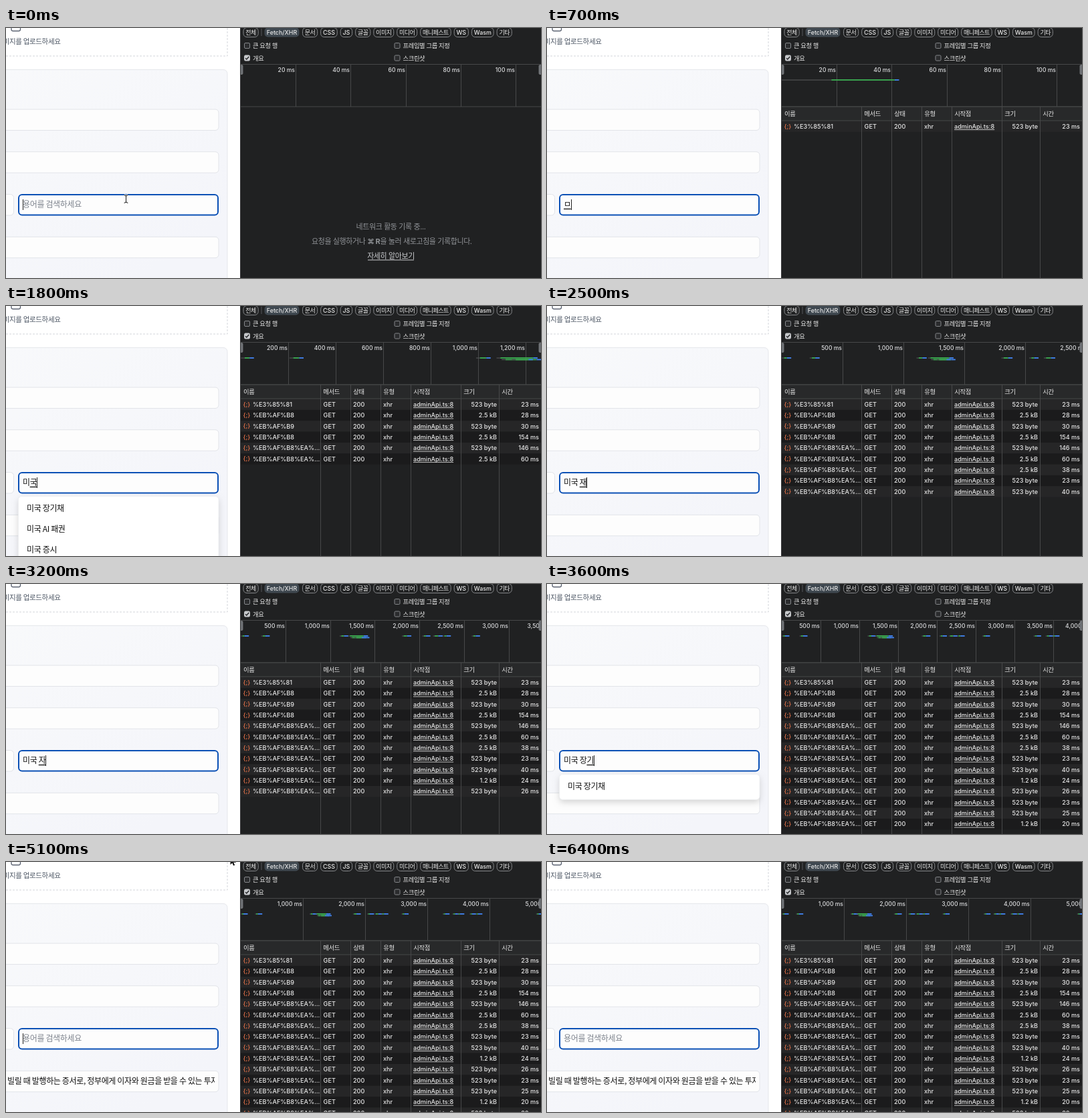
An HTML page with a canvas that plays this animation: 800 px wide and 375 px high, repeating every 6.7 s.

```html
<!DOCTYPE html>
<html lang="ko">
<head>
<meta charset="utf-8">
<title>Search requests</title>
<style>
html, body { margin: 0; width: 100%; height: 100%; overflow: hidden; background: #fff; }
canvas { display: block; width: 100vw; height: 100vh; }
</style>
</head>
<body>
<canvas id="stage" width="800" height="375"></canvas>
<script>
const ctx = document.getElementById('stage').getContext('2d');
const LOOP = 6700, TICK = 100, W = 800, H = 375;
const START = 700, SELECT = 4650, FOCUS = 4900, BLINK = 400;
const PAGE = '"Noto Sans CJK KR", "Noto Sans CJK", sans-serif';
const TOOL = 'Inter, "Noto Sans CJK KR", "Noto Sans CJK", sans-serif';
const LINE = '#474849', LIGHT = '#e8e8e8', MUTED = '#919498';

const ITEMS = ['미국 장기채', '미국 AI 패권', '미국 증시', '미국 국채'];
// every edit sends a request: [time, search text, response ms]
const EDITS = [
  [START, 'ㅁ', 23], [890, '미', 28], [1620, '믹', 30], [1700, '미', 154], [1720, '미구', 146], [1760, '미국', 60],
  [2200, '미국 ', 38], [2390, '미국 ㅈ', 23], [2490, '미국 재', 40], [2580, '미국 장', 24], [2850, '미국 자', 26],
  [3400, '미국 ㅈ', 23], [3530, '미국 자', 25], [3600, '미국 장기', 20], [3760, '미국 장깇', 20],
  [3840, '미국 장기채', 22], [SELECT, '', 24]
];
// time and width of the recorded range in ms
const SPAN = [[0, 109], [START, 109], [1100, 331], [1500, 331], [1800, 1262], [2500, 2460], [3600, 3862], [4900, 4817]];
const PILLS = ['전체', 'Fetch/XHR', '문서', 'CSS', 'JS', '글꼴', '이미지', '미디어', '매니페스트', 'WS', 'Wasm', '기타'];
const COLS = [['메서드', 470.5], ['상태', 515.5], ['유형', 560.5], ['시작점', 605.5], ['크기', 680.5], ['시간', 737.5]];

const matches = s => s ? ITEMS.filter(item => item.startsWith(s)) : [];
const REQUESTS = EDITS.map(([time, query, ms]) => {
  const code = encodeURIComponent(query).replace('%20', ' ');
  return {
    time, ms,
    start: (time - START) * 1.2,
    name: code.length > 9 ? code.slice(0, 13) + '...' : code,
    size: ['523 byte', '1.2 kB', '2.5 kB'][Math.min(2, matches(query).length)]
  };
});

function ramp(keys, t) {
  const i = keys.findIndex(k => k[0] > t);
  if (i < 0) return keys[keys.length - 1][1];
  const [a, b] = [keys[i - 1], keys[i]];
  return a[1] + (b[1] - a[1]) * (t - a[0]) / (b[0] - a[0]);
}

function rect(x, y, w, h, fill) {
  ctx.fillStyle = fill;
  ctx.fillRect(x, y, w, h);
}

function box(x, y, w, h, r, fill, stroke, lw = 1) {
  ctx.beginPath();
  ctx.roundRect(x, y, w, h, r);
  if (fill) { ctx.fillStyle = fill; ctx.fill(); }
  if (stroke) { ctx.strokeStyle = stroke; ctx.lineWidth = lw; ctx.stroke(); }
}

function path(points, stroke, lw = 1) {
  ctx.beginPath();
  points.forEach(p => ctx.lineTo(p[0], p[1]));
  ctx.strokeStyle = stroke;
  ctx.lineWidth = lw;
  ctx.stroke();
}

const hline = y => path([[351, y], [W, y]], LINE);
const vline = (x, y0, y1) => path([[x, y0], [x, y1]], LINE);

function setFont(size, family, weight, gap) {
  ctx.font = `${weight} ${size}px ${family}`;
  ctx.letterSpacing = gap + 'px';
}

const pageFont = (weight = 400) => setFont(12, PAGE, weight, -0.35);
const toolFont = (size = 9.1) => setFont(size, TOOL, 500, 0);
const koFont = () => setFont(9.3, TOOL, 500, -0.35);

function text(s, x, y, color, align = 'left') {
  ctx.textAlign = align;
  ctx.fillStyle = color;
  ctx.fillText(s, x, y);
  return ctx.measureText(s).width;
}

function clip(x, y, w, h, draw) {
  ctx.save();
  ctx.beginPath();
  ctx.rect(x, y, w, h);
  ctx.clip();
  draw();
  ctx.restore();
}

function drawForm(t) {
  rect(0, 0, 351, H, '#fff');
  ctx.setLineDash([3, 2]);
  path([[331, 0], [331, 42], [0, 42]], '#d3d6db');
  ctx.setLineDash([]);
  box(8, -9, 13.5, 13.5, 2.5, null, '#596170', 1.3);
  setFont(10.5, PAGE, 400, -0.35);
  text('이미지를 업로드하세요', 81.5, 23.7, '#4b5563', 'right');

  const shade = ctx.createLinearGradient(0, 62, 200, H);
  shade.addColorStop(0, '#f8f9fb');
  shade.addColorStop(1, '#f4f5fa');
  box(-20, 62.5, 351, 340, 6, shade, '#e5e7eb');
  for (const [y, right] of [[122, 318], [185.7, 318], [249.5, 11.5], [313.3, 318]])
    box(-20, y, right + 20, 31.5, 5, '#fdfdfd', '#e2e4e9');
  box(19, 250, 298, 30.5, 5, '#fdfdfd', '#0b50b5', 2);

  if (t >= SELECT) clip(0, 314, 312, 30, () => {
    pageFont(500);
    text('빌릴 때 발행하는 증서로, 정부에게 이자와 원금을 받을 수 있는 투자', 2, 332.5, '#111');
  });
  const [since, query] = EDITS.findLast(e => e[0] <= t) || [0, ''];
  drawSearch(query, t - (t < FOCUS ? since : FOCUS));
  drawMenu(matches(query));
}

function drawSearch(query, idle) {
  pageFont();
  let end = 25;
  if (query) {
    end += text(query, 25, 268.7, '#111');
    // the last syllable is still being composed
    const from = 25 + ctx.measureText(query.slice(0, -1)).width;
    if (!query.endsWith(' ')) rect(from, 270.8, end - from, 1.3, '#111');
  } else text('용어를 검색하세요', 25, 268.7, '#7c828c');
  if (Math.floor(idle / BLINK) % 2 === 0) rect(Math.round(end), 257, 1, 16, '#222');
}

function drawMenu(items) {
  if (!items.length) return;
  const h = 7 + 31 * items.length;
  ctx.save();
  ctx.shadowColor = 'rgba(0,0,0,.16)';
  ctx.shadowBlur = 10;
  ctx.shadowOffsetY = 4;
  box(18.5, 285.5, 299.5, h, 5, '#fff');
  ctx.restore();
  box(18.5, 285.5, 299.5, h, 5, null, '#eceef1', 0.7);
  pageFont(500);
  items.forEach((item, i) => text(item, 31, 307.5 + 31 * i, '#111'));
}

function drawFilters() {
  let x = 354.5;
  PILLS.forEach((label, i) => {
    const on = i === 1, latin = /[A-Z]/.test(label);
    setFont(latin ? 8.9 : 9, TOOL, 500, latin ? 0 : -0.5);
    const w = ctx.measureText(label).width + 7.6;
    box(x + 0.5, -0.5, w - 1, 14, 5, on ? '#3f4850' : null, on ? null : '#85878a');
    text(label, x + w / 2, 9.9, LIGHT, 'center');
    x += w + 4;
    if (i === 0) {
      path([[382, 1], [382, 12]], '#55575a');
      x = 386;
    }
  });
  const checks = ['큰 요청 행', '프레임별 그룹 지정', '개요', '스크린샷'];
  koFont();
  checks.forEach((label, i) => {
    const x = 356 + i % 2 * 224.5, y = 22 + (i >> 1) * 18.5, on = i === 2;
    box(x + 0.5, y + 0.5, 8, 8, 1.5, on ? '#c7c9cc' : '#2b2c2e', on ? '#c7c9cc' : '#85878a');
    if (on) path([[x + 2, y + 4.7], [x + 3.8, y + 6.5], [x + 7.2, y + 2.5]], '#202124', 1.3);
    text(label, x + 13, y + 8, LIGHT);
  });
}

function drawOverview(t, sent) {
  const left = 351.2, width = 448.6, span = ramp(SPAN, t), px = width / span;
  hline(54.5);
  hline(118);
  clip(351, 55, 449, 63, () => {
    let unit = 10;
    for (let i = 0; unit * px < 50; i++) unit *= i % 3 === 1 ? 2.5 : 2;
    toolFont(8.6);
    for (let ms = unit; ms < span + unit * 1.5; ms += unit) {
      const x = Math.floor(left + ms * px) + 0.5;
      vline(x, 55, 118);
      text(ms.toLocaleString('en-US') + ' ms', x - 1.5, 66.3, '#dcdddf', 'right');
    }
    drawBars(sent, left, width, span);
  });
  for (const x of [350.5, 797]) box(x, 55.5, 3.5, 14, 1.5, '#6c6f73', '#8b8d90', 0.7);
}

function drawBars(sent, left, width, span) {
  const wait = 18, last = Math.max(0, ...sent.map(r => r.start + r.ms + wait + 20));
  const k = width / Math.max(span, last);
  sent.forEach((r, i) => {
    const prev = sent[i - 1];
    const overlap = prev && r.start < prev.start + prev.ms;
    const x = left + r.start * k, y = overlap ? 79.5 : 77;
    const mid = x + wait * k, end = mid + r.ms * k;
    rect(x, y + 0.5, mid - x, 1, '#5a5c5f');
    rect(mid, y, end - mid, 1.8, '#3cae52');
    rect(end, y, 6.5, 1.8, '#4285f4');
  });
}

function drawEmpty() {
  const font = weight => setFont(11, TOOL, weight, -0.4);
  font(400);
  text('네트워크 활동 기록 중...', 575.5, 302, MUTED, 'center');
  text('자세히 알아보기', 575.5, 345.8, '#c9cbce', 'center');
  rect(541, 347.5, 69, 1, '#c9cbce');
  let x = 457;
  ['요청을 실행하거나 ', '⌘ R', '을 눌러 새로고침을 기록합니다.'].forEach((s, i) => {
    font(i === 1 ? 700 : 400);
    x += text(s, x, 324.3, MUTED);
  });
}

function drawTable(sent) {
  const pitch = 16.35, top = 139.5;
  rect(351, 118.5, 449, 21, '#28292a');
  sent.forEach((r, i) => rect(351, top + i * pitch, 449, pitch, i % 2 ? '#1b1b1c' : '#262627'));
  hline(118);
  hline(139);
  koFont();
  text('이름', 355, 131.7, LIGHT);
  for (const [label, x] of COLS) {
    vline(x, 118, H);
    text(label, x + 3.8, 131.7, LIGHT);
  }
  sent.forEach((r, i) => {
    const y = top + i * pitch + 11.4;
    toolFont();
    text('{;}', 354.5, y - 0.3, '#e8734a');
    const cells = [[r.name, 369], ['GET', 474.6], ['200', 519], ['xhr', 564]];
    for (const [s, x] of cells) text(s, x, y, LIGHT);
    const w = text('adminApi.ts:8', 609, y, LIGHT);
    rect(609, y + 1.3, w, 0.8, LIGHT);
    text(r.size, 734, y, LIGHT, 'right');
    text(r.ms + ' ms', 797, y, LIGHT, 'right');
  });
}

function drawTools(t) {
  const sent = REQUESTS.filter(r => r.time <= t);
  rect(350, 0, 450, H, '#202122');
  drawFilters();
  drawOverview(t, sent);
  sent.length ? drawTable(sent) : drawEmpty();
  rect(350, 0, 1, H, '#3a3b3d');
}

function drawArrow(x, y) {
  const shape = [[0, 0], [0, 12], [2.8, 9.4], [4.7, 13.6], [6.6, 12.8], [4.8, 8.7], [8.6, 8.7], [0, 0]];
  const points = shape.map(p => [x + p[0], y + p[1]]);
  path(points, '#fff', 1.6);
  ctx.fillStyle = '#111';
  ctx.fill();
}

function drawBeam(x, y) {
  for (const [color, lw] of [['#fff', 2.6], ['#222', 1.1]]) {
    path([[x, y - 5], [x, y + 5]], color, lw);
    for (const s of [-6, 6]) path([[x - 2.8, y + s], [x, y + s * 0.8], [x + 2.8, y + s]], color, lw);
  }
}

function drawPointer(t) {
  if (t < 100) drawBeam(179.5, 256.5);
  else if (t < START) {
    const p = Math.min(1, t / 300);
    drawArrow(179 + 131 * p, 256 - 234 * p);
  } else if (t >= 5100 && t < 5600) {
    const p = (t - 5100) / 400;
    drawArrow(335.5 + 192 * p, -8 - 3 * p);
  }
}

function frame(now) {
  const t = Math.floor(now % LOOP / TICK) * TICK;
  ctx.clearRect(0, 0, W, H);
  drawForm(t);
  drawTools(t);
  drawPointer(t);
  requestAnimationFrame(frame);
}
requestAnimationFrame(frame);
</script>
</body>
</html>
```
